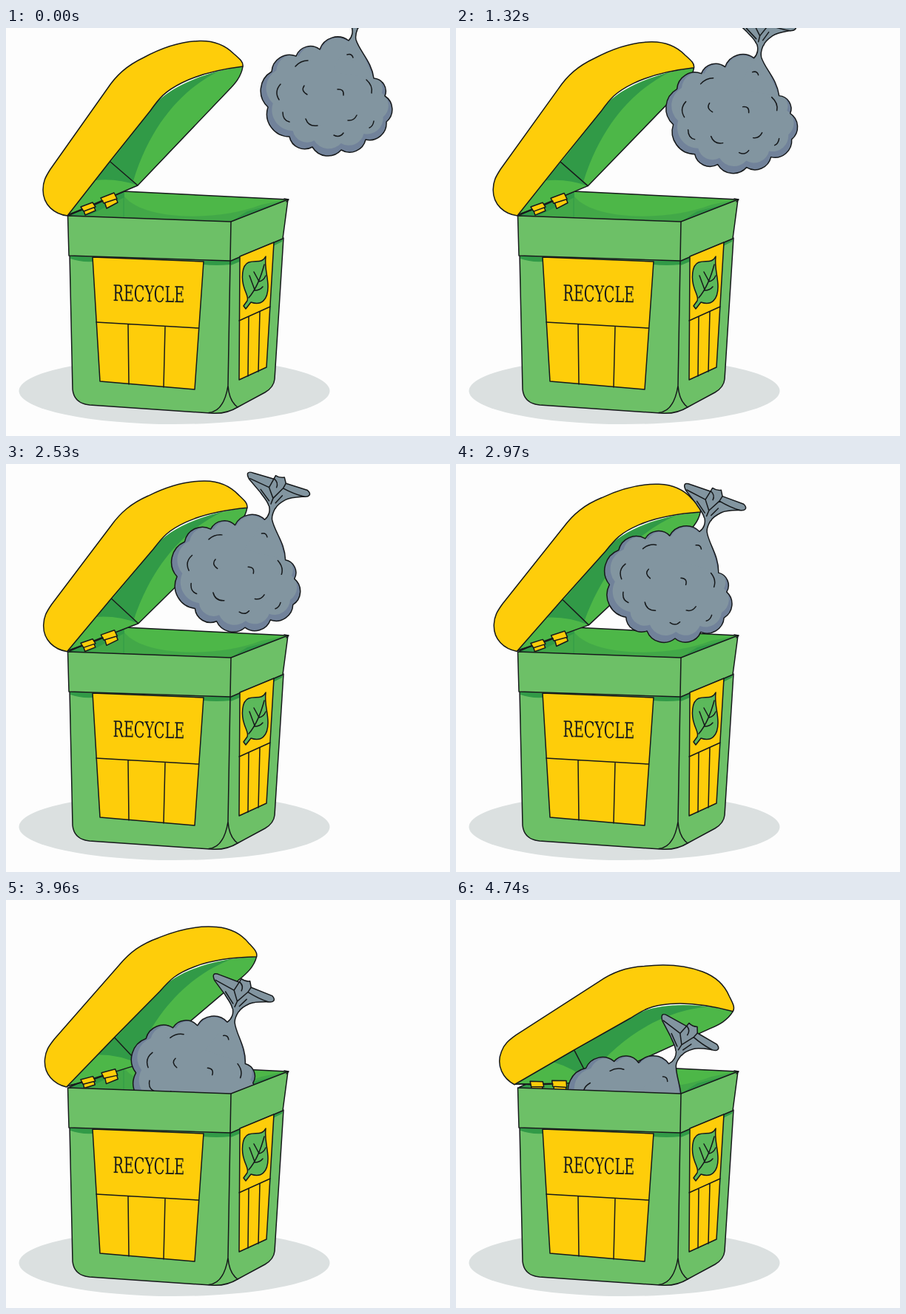
Recreate the animation shown at these times as an HTML page. Size 600 by 552 pixels, loop 4.85 s.

```html
<!DOCTYPE html>
<html lang="en">
<head>
<meta charset="utf-8">
<title>Recycle bin</title>
<style>
  html, body { margin: 0; width: 100%; height: 100%; overflow: hidden; background: #fdfdfd; }
  svg { display: block; width: 600px; height: 552px; }
  .ink { stroke: #16191b; stroke-width: 1.5; stroke-linejoin: round; stroke-linecap: round; }
  .line { fill: none; }
  .light { fill: #6dc067; }
  .mid { fill: #4db748; }
  .dark { fill: #319a47; }
  .yellow { fill: #fecd0a; }
  .gray { fill: #8295a0; }
  .shade { fill: #71829a; }
  .label { font: 30px "DejaVu Serif", serif; fill: #16191b; }
</style>
</head>
<body>
<svg viewBox="0 0 600 552">
  <defs>
    <clipPath id="sackClip"><path class="sackShape"/></clipPath>
  </defs>

  <ellipse cx="227.500" cy="491" rx="210" ry="45" fill="#dbe0e0"/>

  <g id="inside">
    <path fill="#42a848" d="M84 254L160 221L381 232L304 262Z"/>
    <path class="mid" d="M160 221L381 232L345 239C290 261 188 262 160 228Z"/>
    <path class="dark" d="M304 262L326 248Q356 241 381 232Z"/>
    <path class="dark" d="M84 254L160 221V229L112 254Z"/>
    <path class="ink line" d="M86 253L160 221L381 232"/>
    <path class="line" stroke="#319a47" d="M159 229V256"/>
  </g>

  <g id="lid">
    <path class="mid" d="M83 254L140 181L195 112C212 84 262 60 320 52C318 66 309 76 300 85L178 213Z"/>
    <path class="dark" d="M142 181L195 112C212 85 250 70 288 58C246 79 198 122 172 207Z"/>
    <path class="dark" d="M140 181L178 213Q150 203 121 206Z"/>
    <path class="ink line" d="M320 52C318 66 309 76 300 85L178 213L84 253M141 181L178 213"/>
    <path class="ink yellow" d="M83 254C66 252 50 240 50 219C50 208 53 202 60 191L137 82C149 64 163 51 186 40C210 27 237 18 262 17.500C284 17 298 25 308 35C316 42 321 46 320 52C296 55 262 62 238 74C214 86 207 95 195 112L140 181Z"/>
    <g class="ink yellow">
      <path d="M104 244L107 253L121 247L118 240Z"/>
      <path d="M101 242L117 236L121 242L105 248Z"/>
      <path d="M133 235L136 244L151 236L148 229Z"/>
      <path d="M128 230L146 223L150 231L132 237Z"/>
    </g>
    <path class="ink line" stroke-width="2" d="M88 251L103 246M120 239L131 234"/>
  </g>

  <g id="sack">
    <path class="shade sackShape"/>
    <g clip-path="url(#sackClip)">
      <path class="gray sackShape" transform="translate(450 35) scale(.93) translate(-450 -35)"/>
      <path class="gray" d="M440 60L463 17L466 -6H478L474 16L497 68Z"/>
    </g>
    <path class="ink line sackShape"/>
    <path class="ink gray" d="M466 -3C463 -10 456 -15 453 -19L436 -35C431 -42 432 -46 441 -44L469 -39L471 -44Q477 -41 483 -43L486 -35L516 -29C523 -24 519 -20 512 -20C501 -18 494 -17 488 -13C481 -8 477 -4 476 0"/>
    <path class="ink line" d="M437 -36Q452 -31 464 -27L469 -39M464 -27L471 -13L483 -28L486 -35M483 -28Q498 -22 512 -20M453 -23L466 -9M471 -13L469 -5M483 -18L475 -7M470 -39Q476 -35 474 -28"/>
    <path class="ink line" d="M391 52Q398 44 408 44M461 36Q467 34 469 40M371 76Q362 86 369 97M403 78Q398 85 407 90M448 83Q457 82 456 91M487 70Q496 78 494 88M405 123Q409 134 421 132M462 125Q470 126 474 118M374 114Q374 125 383 127M443 145Q451 149 456 142M491 135Q496 133 497 126"/>
  </g>

  <g id="front">
    <path class="ink light" d="M86 306L90 489Q92 508 113 510L276 521Q297 523 313 513L350 493Q362 486 363 475L375 284Z"/>
    <path class="dark" d="M87 308L117 310L118 316Q100 317 87 312ZM266 315L304 315V320Q284 322 266 320ZM304 315L316 310V316L304 321ZM361 291L374 285L373 289L361 295Z"/>
    <path class="ink light" d="M83.500 254L304 262L381 232L374 285L304 315L85 308Z"/>
    <path class="ink line" d="M304 262L303 315L300 484C297 503 290 519 274 520.500M300 484C301 498 306 508 313 513M376 231L382 232L379 235"/>

    <path class="ink yellow" d="M117 310L267 316L255 489L127 478Z"/>
    <path class="ink line" d="M122 398L260 406M165 401L166 482M215 404L213 486"/>
    <path class="ink yellow" d="M316 309L362 290L352 459L315 476Z"/>
    <path class="ink line" d="M315 396L357 377M328 391L327 471M343 384L341 465"/>

    <path class="ink" fill="#5cb95b" d="M351 309C346 319 338 314 328 317C318 321 318 340 322 352C325 361 328 365 326 369L321 376L324 380L331 371C345 376 354 368 354 350C354 335 349 325 351 309Z"/>
    <path class="ink line" d="M328 365Q341 350 349 320M336 354L329 335M342 343L335 330M336 355Q343 355 347 350M342 343Q348 342 351 335"/>
    <text class="label" transform="matrix(.638 .016 0 1 144.500 369)">RECYCLE</text>
  </g>
</svg>
<script>
const LOOP = 4850, STEP = 110, LAST = 4740;

// Bumpy outline: cusps joined by outward arcs, from the neck around to the neck.
const cusps = [[463, 17], [424, 29], [392, 38], [359, 59], [354, 107], [383, 147],
  [414, 161], [453, 165], [486, 151], [514, 127], [512, 92], [497, 68]];

function sackPath() {
  let d = "M466 -4C470 4 468 12 463 17";
  for (let i = 1; i < cusps.length; i++) {
    const [x, y] = cusps[i], [px, py] = cusps[i - 1];
    const r = (Math.hypot(x - px, y - py) * 0.62).toFixed(1);
    d += `A${r} ${r} 0 0 0 ${x} ${y}`;
  }
  return d + "C494 45 478 32 473 16C471 8 475 2 477 -4";
}
document.querySelectorAll(".sackShape").forEach(p => p.setAttribute("d", sackPath()));

// time, neck x, neck y, angle
const sackKeys = [[0, 465, 17.5, 0], [1760, 384.5, 49, 0], [2530, 351.5, 76, 6.5],
  [3100, 325, 97, 9.8], [3960, 301, 166, 10.5], [4740, 289.3, 222.8, 19]];
// time, angle
const lidKeys = [[0, 0], [1760, 0.6], [2530, 1.8], [2970, 3.2], [3960, 6], [4740, 21.9]];

function pose(keys, t) {
  let i = 1;
  while (i < keys.length - 1 && t > keys[i][0]) i++;
  const a = keys[i - 1], b = keys[i], k = (t - a[0]) / (b[0] - a[0]);
  return a.slice(1).map((v, j) => v + (b[j + 1] - v) * k);
}

const sack = document.getElementById("sack"), lid = document.getElementById("lid");
const start = performance.now();

function draw() {
  const now = (performance.now() - start) % LOOP;
  const t = now >= LAST ? LAST : Math.min(42, Math.floor(now / STEP)) * STEP;
  const [x, y, turn] = pose(sackKeys, t);
  sack.setAttribute("transform", `translate(${x} ${y}) rotate(${turn}) translate(-465 -17.5)`);
  lid.setAttribute("transform", `rotate(${pose(lidKeys, t)[0]} 92 241.5)`);
  requestAnimationFrame(draw);
}
draw();
</script>
</body>
</html>
```
